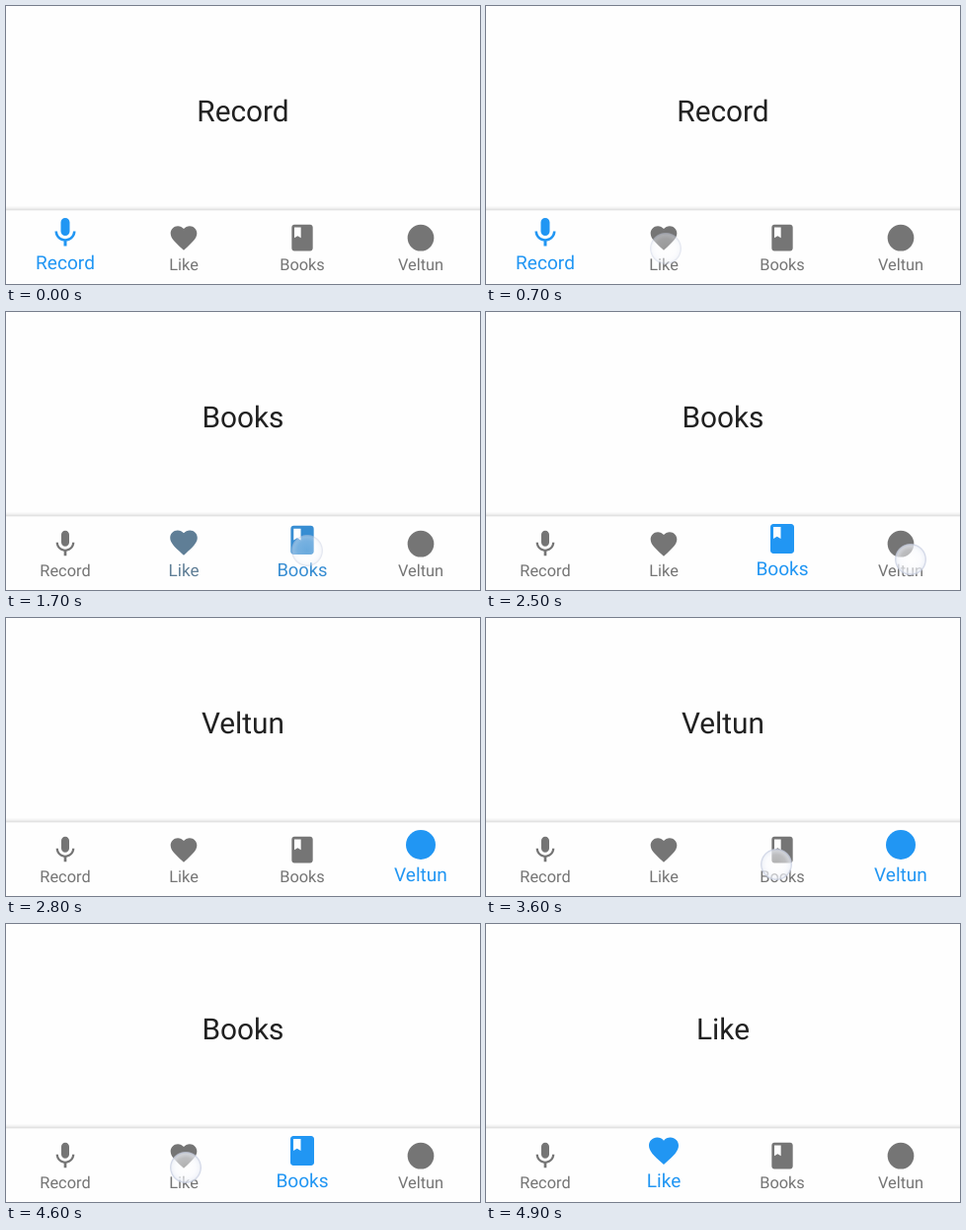
Recreate the animation shown at these times as an HTML page. Size 480 by 282 pixels, loop 5.1 s.

```html
<!DOCTYPE html>
<html lang="en">
<head>
<meta charset="utf-8">
<title>Bottom navigation</title>
<style>
  html, body { margin: 0; width: 100%; height: 100%; overflow: hidden; background: #fefefe; }
  svg { display: block; width: 480px; height: 282px; }
  text { font-family: Roboto, "Liberation Sans", sans-serif; text-anchor: middle; text-rendering: geometricPrecision; }
  #title { font-size: 29.8px; fill: #212121; }
  .label { font-size: 19.1px; }
</style>
</head>
<body>
<svg viewBox="0 0 480 282">
  <defs>
    <linearGradient id="shade" x1="0" y1="0" x2="0" y2="1">
      <stop offset="0" stop-color="#000" stop-opacity="0"/>
      <stop offset=".5" stop-color="#000" stop-opacity=".05"/>
      <stop offset="1" stop-color="#000" stop-opacity=".15"/>
    </linearGradient>
    <radialGradient id="dot">
      <stop offset="0" stop-color="#fff" stop-opacity=".42"/>
      <stop offset=".6" stop-color="#f8f9fd" stop-opacity=".55"/>
      <stop offset=".84" stop-color="#eef1f8" stop-opacity=".75"/>
      <stop offset=".93" stop-color="#c6cde0" stop-opacity=".85"/>
      <stop offset="1" stop-color="#d5daea" stop-opacity="0"/>
    </radialGradient>
  </defs>
  <rect width="480" height="282" fill="#fefefe"/>
  <text id="title" x="240" y="117"></text>
  <rect y="202.5" width="480" height="5" fill="url(#shade)"/>
  <rect y="207.5" width="480" height="75" fill="#fefefe"/>
  <g id="tabs"></g>
  <circle id="touch" r="16.5" fill="url(#dot)"/>
</svg>
<script>
const LOOP = 5100, STEP = 100, ANIM = 200;
const GRAY = [117, 117, 117], BLUE = [33, 150, 243];

const tabs = [
  { name: 'Record', icon: 'M12 14c1.66 0 3-1.34 3-3V5c0-1.66-1.34-3-3-3S9 3.34 9 5v6c0 1.66 1.34 3 3 3zm5.3-3c0 3-2.54 5.1-5.3 5.1S6.7 14 6.7 11H5c0 3.41 2.72 6.23 6 6.72V21h2v-3.28c3.28-.48 6-3.3 6-6.72h-1.7z' },
  { name: 'Like', icon: 'M12 21.35l-1.45-1.32C5.4 15.36 2 12.28 2 8.5 2 5.42 4.42 3 7.5 3c1.74 0 3.41.81 4.5 2.09C13.09 3.81 14.76 3 16.5 3 19.58 3 22 5.42 22 8.5c0 3.78-3.4 6.86-8.55 11.54z' },
  { name: 'Books', icon: 'M18 2H6c-1.1 0-2 .9-2 2v16c0 1.1.9 2 2 2h12c1.1 0 2-.9 2-2V4c0-1.1-.9-2-2-2zM6 4h5v8l-2.5-1.5L6 12z' },
  { name: 'Veltun', icon: 'M2 12a10 10 0 0 1 20 0a10 10 0 0 1-20 0z' }
];

// at: finger down; start: selection begins to move; dots: touch opacity per step
const slow = [0.6, 1, 0.6], quick = [1, 0.6];
const taps = [
  { at: 700, start: 806, to: 1, x: 182, y: 246, dots: slow },
  { at: 1500, start: 1606, to: 2, x: 305, y: 242, dots: slow },
  { at: 2500, start: 2560, to: 3, x: 430, y: 251, dots: quick },
  { at: 3600, start: 3660, to: 2, x: 294, y: 250, dots: quick },
  { at: 4600, start: 4660, to: 1, x: 182, y: 247, dots: quick }
];

const $ = id => document.getElementById(id);
const mix = (a, b, p) => a + (b - a) * p;

function add(parent, tag, attrs) {
  const el = document.createElementNS('http://www.w3.org/2000/svg', tag);
  for (const key in attrs) el.setAttribute(key, attrs[key]);
  return parent.appendChild(el);
}

// cubic-bezier(.4, 0, .2, 1)
function ease(x) {
  if (x <= 0) return 0;
  if (x >= 1) return 1;
  let lo = 0, hi = 1, u = 0.5;
  for (let i = 0; i < 24; i++) {
    u = (lo + hi) / 2;
    const bx = 1.2 * u * (1 - u) ** 2 + 0.6 * u * u * (1 - u) + u ** 3;
    if (bx < x) lo = u; else hi = u;
  }
  return 3 * u * u * (1 - u) + u ** 3;
}

tabs.forEach((tab, i) => {
  tab.x = 60 + 120 * i;
  tab.group = add($('tabs'), 'g', {});
  tab.shape = add(tab.group, 'path', { d: tab.icon });
  tab.label = add(tab.group, 'text', { class: 'label' });
  tab.label.textContent = tab.name;
});

function place(tab, p) {
  const rgb = GRAY.map((c, k) => Math.round(mix(c, BLUE[k], p)));
  tab.group.setAttribute('fill', `rgb(${rgb})`);
  tab.shape.setAttribute('transform',
    `translate(${tab.x} ${mix(235.2, 230, p)}) scale(${mix(32, 36, p) / 24}) translate(-12 -12)`);
  tab.label.setAttribute('transform',
    `translate(${tab.x} ${mix(268.3, 267.4, p)}) scale(${mix(12 / 14, 1, p)})`);
}

function draw(ms) {
  const t = Math.floor((ms % LOOP) / STEP) * STEP;
  const levels = [1, 0, 0, 0];
  let current = 0, dot = 0;
  for (const tap of taps) {
    if (t < tap.at) break;
    const p = ease((t - tap.start) / ANIM);
    levels[current] = 1 - p;
    levels[tap.to] = p;
    if (p > 0) current = tap.to;
    dot = tap.dots[(t - tap.at) / STEP] || 0;
    $('touch').setAttribute('cx', tap.x);
    $('touch').setAttribute('cy', tap.y);
  }
  tabs.forEach((tab, i) => place(tab, levels[i]));
  $('title').textContent = tabs[current].name;
  $('touch').setAttribute('opacity', dot);
}

const begin = performance.now();
function tick() {
  draw(performance.now() - begin);
  requestAnimationFrame(tick);
}
tick();
</script>
</body>
</html>
```
